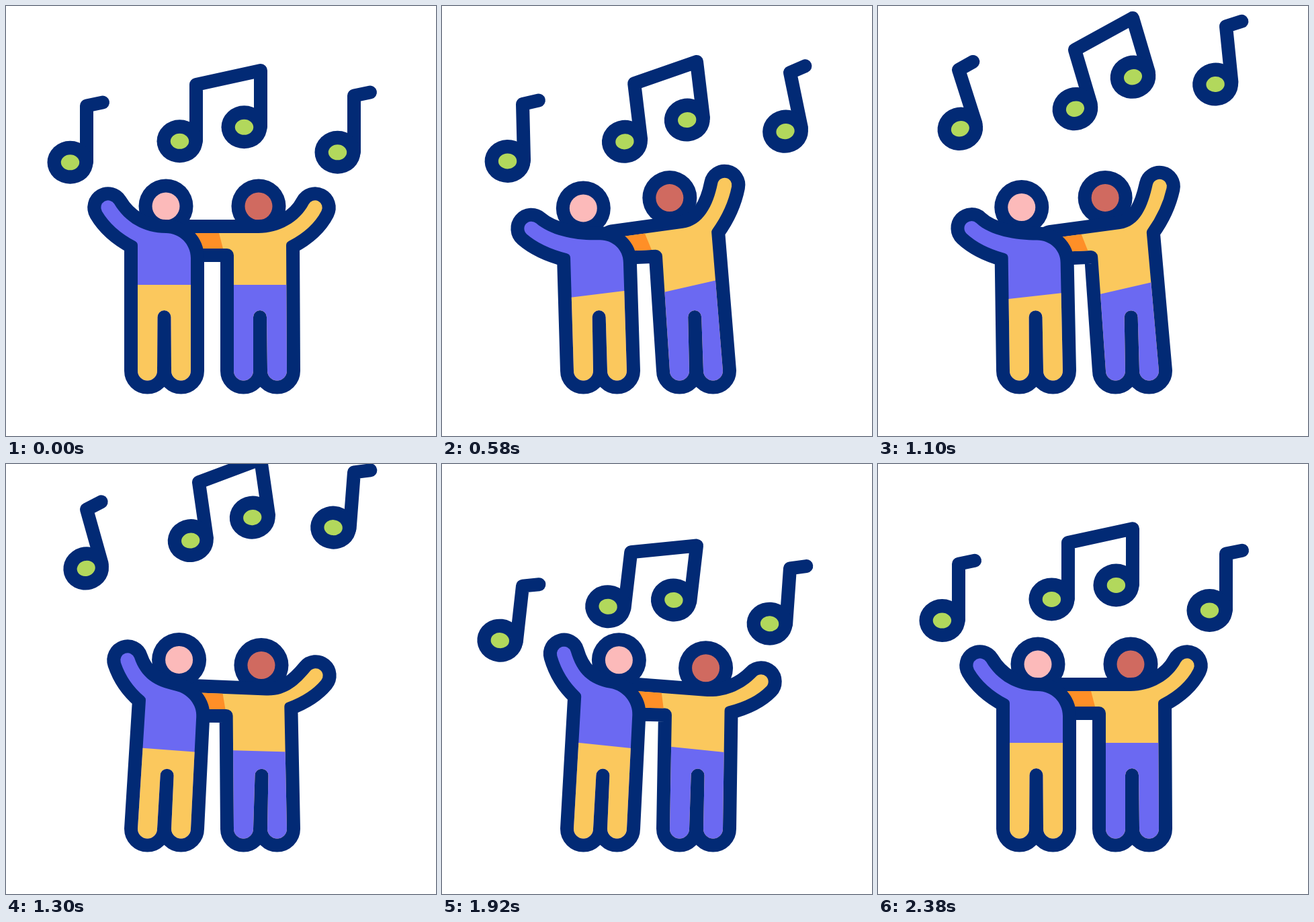
An HTML page with a canvas for the animation above (2.4 s loop, 640x640 px).

```html
<!DOCTYPE html>
<html>
<head>
<meta charset="utf-8">
<style>
html, body { margin: 0; width: 100%; height: 100%; overflow: hidden; background: #fff; }
canvas { display: block; width: 640px; height: 640px; }
</style>
</head>
<body>
<canvas id="stage" width="640" height="640"></canvas>
<script>
const ctx = document.getElementById('stage').getContext('2d');
const LOOP = 2400;
const NAVY = '#022a75', PURPLE = '#6b69f2', YELLOW = '#fbc85d', ORANGE = '#ff8f27',
      PINK = '#fcbaba', BROWN = '#d06a60', GREEN = '#b2d85c';

// Each value lists the poses: upright, swayed left, swayed right.
const left = {
  head: [[238, 298], [200, 302], [287, 286]],
  hand: [[152, 300], [126, 343], [209, 266]],
  elbow: [[168, 327], [150, 359], [212, 303]],
  neck: [[238, 338], [232, 352], [262, 330]],
  corner: [[275, 338], [268, 350], [295, 342]],
  side: [[275, 375], [268, 384], [291, 372]],
  armpit: [[196, 352], [189, 376], [218, 334]],
  hips: [[415, 415], [441, 424], [412, 432]],
  crotch: [[235.5, 463], [233, 463], [243, 464]]
};
const right = {
  head: [[376, 298], [325, 281], [408, 309]],
  hand: [[460, 300], [406, 254], [489, 346]],
  elbow: [[446, 327], [402, 290], [465, 359]],
  neck: [[376, 338], [352, 328], [405, 353]],
  reachTop: [[262, 338], [250, 348], [290, 336]],
  reachLow: [[275, 361], [270, 366], [300, 364]],
  corner: [[339, 361], [323, 363], [345, 366]],
  cuffTop: [[317, 338], [296, 338], [336, 343]],
  cuffLow: [[323, 361], [308, 364], [336, 366]],
  armpit: [[417, 352], [395, 328], [424, 371]],
  hips: [[415, 415], [430, 399], [424, 444]],
  crotch: [[378, 463], [375.5, 463], [383, 464]]
};
const notes = [
  { x: 120, y: 148.5, start: 455, cut: 1890, enter: 1595, swing: 18, tilt: -9.6, rise: 126 },
  { x: 379, y: 96, start: 285, cut: 1610, enter: 1436, swing: 18, tilt: -13, rise: 128, pair: true },
  { x: 518, y: 133.5, start: 85, cut: 1500, enter: 1334, swing: 14.5, tilt: -9.3, rise: 128 }
];

const ease = (t, from, to) => {
  const p = Math.min(1, Math.max(0, (t - from) / (to - from)));
  return (1 - Math.cos(Math.PI * p)) / 2;
};
const along = (a, b, k) => [a[0] + (b[0] - a[0]) * k, a[1] + (b[1] - a[1]) * k];

function poseAt(figure, t) {
  const toLeft = ease(t, 60, 860), toRight = ease(t, 950, 1530), back = ease(t, 1540, 2320);
  const pose = {};
  for (const key in figure) {
    const [up, l, r] = figure[key];
    pose[key] = along(along(along(up, l, toLeft), r, toRight), up, back);
  }
  return pose;
}

function disc(x, y, rx, ry, color) {
  ctx.fillStyle = color;
  ctx.beginPath();
  ctx.ellipse(x, y, rx, ry, 0, 0, 7);
  ctx.fill();
}

// Two legs, from the outer or inner side at footX across to the other side.
function addLegs(path, footX, dir, crotch) {
  const foot = 543, [cx, cy] = crotch, r = 14.5, ccw = dir < 0;
  const cap = x => path.arc(x + dir * r, foot, r, ccw ? 0 : Math.PI, ccw ? Math.PI : 0, !ccw);
  path.lineTo(footX, foot);
  cap(footX);
  path.lineTo(cx - dir * 10, cy);
  path.arc(cx, cy, 10, ccw ? 0 : Math.PI, ccw ? Math.PI : 0, ccw);
  path.lineTo(footX + dir * 50, foot);
  cap(footX + dir * 50);
}

// Raised arm from the armpit round the hand to the neck.
function addArm(path, p, outward, neckControl) {
  const dx = p.elbow[0] - p.hand[0], dy = p.elbow[1] - p.hand[1];
  const k = 10.7 / Math.hypot(dx, dy) * outward;
  const n = [-dy * k, dx * k];
  const off = (a, s) => [a[0] + n[0] * s, a[1] + n[1] * s];
  const low = off(p.elbow, 1), angle = Math.atan2(n[1], n[0]);
  path.arcTo(...p.armpit, ...low, 7);
  path.quadraticCurveTo(...low, ...off(p.hand, 1));
  path.arc(...p.hand, 10.7, angle, angle + Math.PI, outward < 0);
  path.bezierCurveTo(...off(p.elbow, -1), ...neckControl, ...p.neck);
}

function leftBody(p) {
  const path = new Path2D();
  path.moveTo(...p.side);
  addLegs(path, 275, -1, p.crotch);
  addArm(path, p, 1, along(p.neck, p.corner, -0.9));
  path.bezierCurveTo(...along(p.neck, p.corner, 0.55), ...along(p.side, p.corner, 0.55), ...p.side);
  path.closePath();
  return path;
}

function rightBody(p) {
  const path = new Path2D();
  const reach = Math.hypot(p.neck[0] - p.reachTop[0], p.neck[1] - p.reachTop[1]);
  path.moveTo(...p.reachTop);
  path.lineTo(...p.reachLow);
  path.arcTo(...p.corner, 339, 543, 10);
  addLegs(path, 339, 1, p.crotch);
  addArm(path, p, -1, along(p.neck, p.reachTop, -30 / reach));
  path.closePath();
  return path;
}

function polygon(color, ...points) {
  ctx.fillStyle = color;
  ctx.beginPath();
  points.forEach(p => ctx.lineTo(...p));
  ctx.fill();
}

function drawFigure(p, path, skin, shirt, trousers, hipX) {
  disc(...p.head, 40.5, 40.5, NAVY);
  disc(...p.head, 20.5, 20.5, skin);
  ctx.lineWidth = 40;
  ctx.stroke(path);
  ctx.save();
  ctx.clip(path);
  ctx.fillStyle = shirt;
  ctx.fillRect(0, 0, 640, 640);
  polygon(trousers, [hipX, p.hips[0]], [hipX + 100, p.hips[1]], [hipX + 100, 640], [hipX, 640]);
  if (p.cuffTop) {
    polygon(ORANGE, along(p.cuffLow, p.cuffTop, 1.3), along(p.cuffTop, p.cuffLow, 1.3),
      [p.reachLow[0] - 30, p.reachLow[1] + 10], [p.reachTop[0] - 30, p.reachTop[1] - 10]);
  }
  ctx.restore();
}

function drawNote(note, dy, degrees) {
  ctx.save();
  ctx.translate(note.x, note.y + dy);
  ctx.rotate(-degrees * Math.PI / 180);
  const stems = note.pair ? [[0, 0], [-96, 21]] : [[0, 0]];
  ctx.lineWidth = 20;
  ctx.beginPath();
  ctx.moveTo(0, 84);
  ctx.lineTo(0, 0);
  if (note.pair) {
    ctx.lineTo(-96, 21);
    ctx.lineTo(-96, 105);
  } else {
    ctx.lineTo(24, -5);
  }
  ctx.stroke();
  for (const [x, y] of stems) {
    disc(x - 24.5, y + 84.3, 34, 32, NAVY);
    disc(x - 24.5, y + 84.3, 13.7, 11.5, GREEN);
  }
  ctx.restore();
}

function drawNotes(t) {
  for (const note of notes) {
    const { start, swing } = note;
    if (t < note.cut) {
      const turn = swing * ease(t, start, start + 700) - (swing + 13) * ease(t, start + 700, start + 1530);
      drawNote(note, -note.rise * ease(t, start, start + 1430), turn);
    }
    if (t >= note.enter) {
      const rest = 1 - ease(t, note.enter, 2420);
      drawNote(note, 50 * rest, note.tilt * rest);
    }
  }
}

function frame(now) {
  const t = now % LOOP;
  ctx.fillStyle = '#fff';
  ctx.fillRect(0, 0, 640, 640);
  ctx.strokeStyle = NAVY;
  ctx.lineJoin = ctx.lineCap = 'round';
  const l = poseAt(left, t), r = poseAt(right, t);
  drawFigure(r, rightBody(r), BROWN, YELLOW, PURPLE, 330);
  drawFigure(l, leftBody(l), PINK, PURPLE, YELLOW, 190);
  drawNotes(t);
  requestAnimationFrame(frame);
}
requestAnimationFrame(frame);
</script>
</body>
</html>
```
